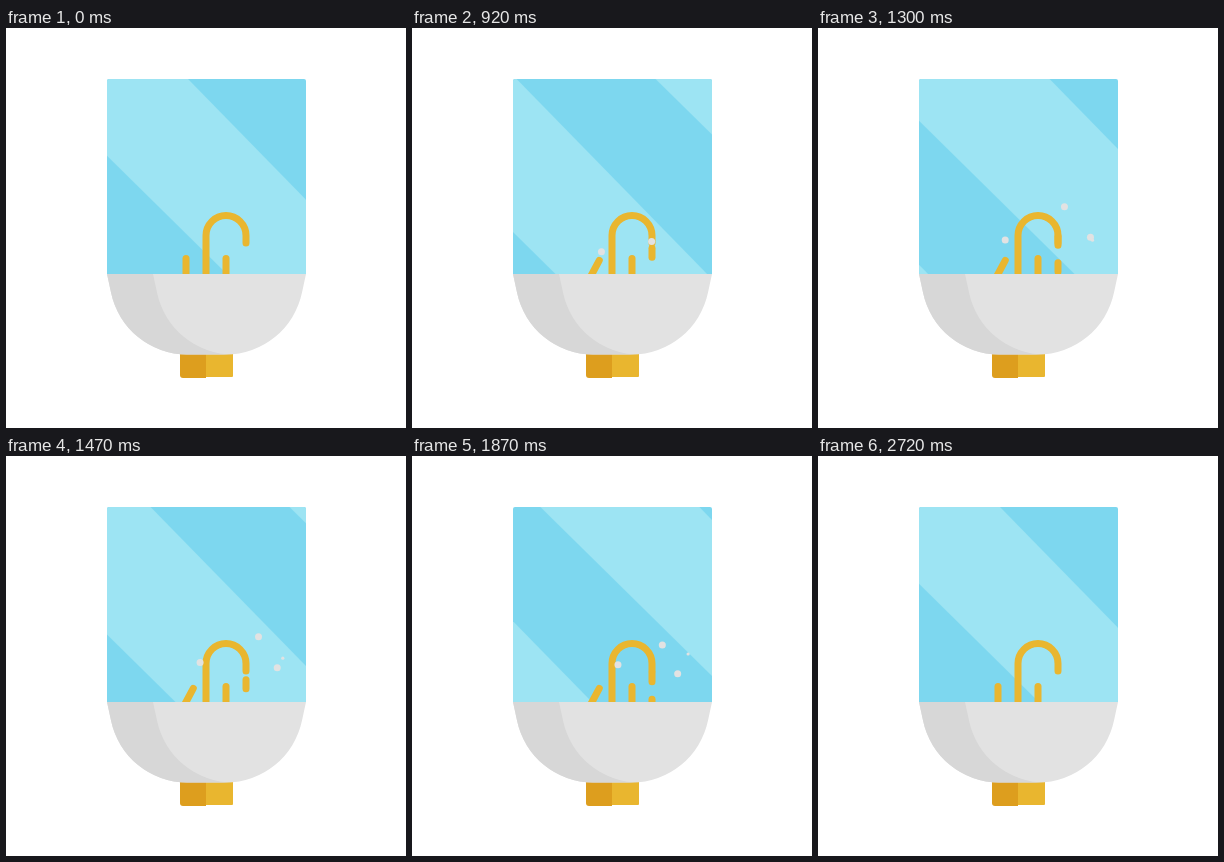
An HTML page with a canvas that plays this animation: 400x400 px, repeating every 2.75 s.

```html
<!DOCTYPE html>
<html>
<head>
<meta charset="utf-8">
<style>
html, body { margin: 0; width: 100%; height: 100%; overflow: hidden; background: #fff; }
canvas { display: block; }
</style>
</head>
<body>
<canvas id="stage" width="400" height="400"></canvas>
<script>
const ctx = document.getElementById('stage').getContext('2d');
const LOOP = 2750, START = 500, END = 2700, RIM = 246;
const GOLD = '#e9b62f', SINK = '#e2e2e2';

// Each bubble drifts through its waypoints, one per BEAT
const BEAT = 390, FIRST = 720;
const bubbles = [
  { birth: 720, size: 3.5, path: [[198, 227], [183, 219], [195, 206], [206, 209], [194, 216]] },
  { birth: 720, size: 3.5, path: [[241, 244], [240, 185], [253, 181], [250, 189], [240, 183]] },
  { birth: 930, size: 3.5, path: [[262, 250], [272, 212], [271, 212], [266, 218], [287, 217]] },
  { birth: 1150, size: 1.6, path: [[272, 245], [272, 225], [277, 201], [276, 198], [273, 200]] }
];

const basin = new Path2D('M101 246H300L296 264.6A78 78 0 0 1 220 326.6H181A78 78 0 0 1 105 264.6Z');
const shade = new Path2D('M101 246H147L151 264.6A78 78 0 0 0 227 326.6H181A78 78 0 0 1 105 264.6Z');
const faucet = new Path2D('M200 250V207.5A20 20 0 0 1 240 207.5V215');

const clamp = (v, lo = 0, hi = 1) => Math.min(hi, Math.max(lo, v));
const smooth = v => v * v * (3 - 2 * v);
const ramp = (t, from, length) => smooth(clamp((t - from) / length));

// Bezier easing (.33, 0, .406, 1), solved by bisection
function ease(u) {
  let lo = 0, hi = 1, s;
  for (let i = 0; i < 24; i++) {
    s = (lo + hi) / 2;
    const x = 3 * s * (1 - s) ** 2 * .33 + 3 * s * s * (1 - s) * .406 + s ** 3;
    if (x < u) lo = s; else hi = s;
  }
  return smooth(s);
}

// Catmull-Rom curve, held at both ends
function along(path, pos) {
  const last = path.length - 1;
  pos = clamp(pos, 0, last);
  const i = Math.floor(pos), u = pos - i;
  const [p, a, b, q] = [-1, 0, 1, 2].map(n => path[clamp(i + n, 0, last)]);
  return a.map((v, k) => v + u / 2 * (b[k] - p[k]
    + u * (2 * p[k] - 5 * v + 4 * b[k] - q[k] + u * (3 * (v - b[k]) + q[k] - p[k]))));
}

function line(x1, y1, x2, y2) {
  ctx.beginPath();
  ctx.moveTo(x1, y1);
  ctx.lineTo(x2, y2);
  ctx.stroke();
}

function box(color, ...shape) {
  ctx.fillStyle = color;
  ctx.beginPath();
  ctx.roundRect(...shape);
  ctx.fill();
}

function mirror(t) {
  const top = 51, height = RIM - top;
  ctx.save();
  box('#7dd7ef', 101, top, 199, height, [2, 2, 0, 0]);
  ctx.clip();
  ctx.fillStyle = '#9de4f3';
  const shift = 610 * ease(clamp((t - START) / (END - START)));
  for (const [left, right] of [[23, 182], [321, 494], [633, 792]]) {
    ctx.beginPath();
    ctx.moveTo(left - shift, top);
    ctx.lineTo(right - shift, top);
    ctx.lineTo(right - shift + height * .977, RIM);
    ctx.lineTo(left - shift + height * 1.015, RIM);
    ctx.fill();
  }
  ctx.restore();
}

function water(t) {
  const speed = .2475, period = 26.5, dash = 9;
  for (let i = 0; i < 16; i++) {
    const end = 229 + speed * (t - 920) - period * i;
    if (end > 208 && end < RIM + 20) line(240, Math.max(208, end - dash), 240, end);
  }
}

function taps(t) {
  ctx.strokeStyle = GOLD;
  ctx.lineWidth = 7;
  ctx.lineCap = 'round';
  water(t);
  ctx.stroke(faucet);
  line(220, 230.5, 220, 248);
  ctx.save();
  ctx.translate(180, RIM);
  ctx.rotate((ramp(t, START, 300) - ramp(t, 2420, 300)) * 28 * Math.PI / 180);
  line(0, -15.5, 0, 2);
  ctx.restore();
}

function drawBubbles(t) {
  ctx.fillStyle = SINK;
  for (const { birth, size, path } of bubbles) {
    const [x, y] = along(path, (t - FIRST) / BEAT);
    const radius = size * ramp(t, birth, 150) * (1 - ramp(t, 2400, 300));
    ctx.beginPath();
    ctx.arc(x, y, radius, 0, 7);
    ctx.fill();
  }
}

function sink() {
  box(GOLD, 200, 320, 27, 29, [0, 0, 1, 0]);
  box('#dd9e1e', 174, 320, 26, 30, [0, 0, 0, 3]);
  ctx.fillStyle = SINK;
  ctx.fill(basin);
  ctx.fillStyle = '#d7d7d7';
  ctx.fill(shade);
}

const begin = performance.now();
function tick() {
  const t = (performance.now() - begin) % LOOP;
  ctx.clearRect(0, 0, 400, 400);
  mirror(t);
  taps(t);
  drawBubbles(t);
  sink();
  requestAnimationFrame(tick);
}
tick();
</script>
</body>
</html>
```
